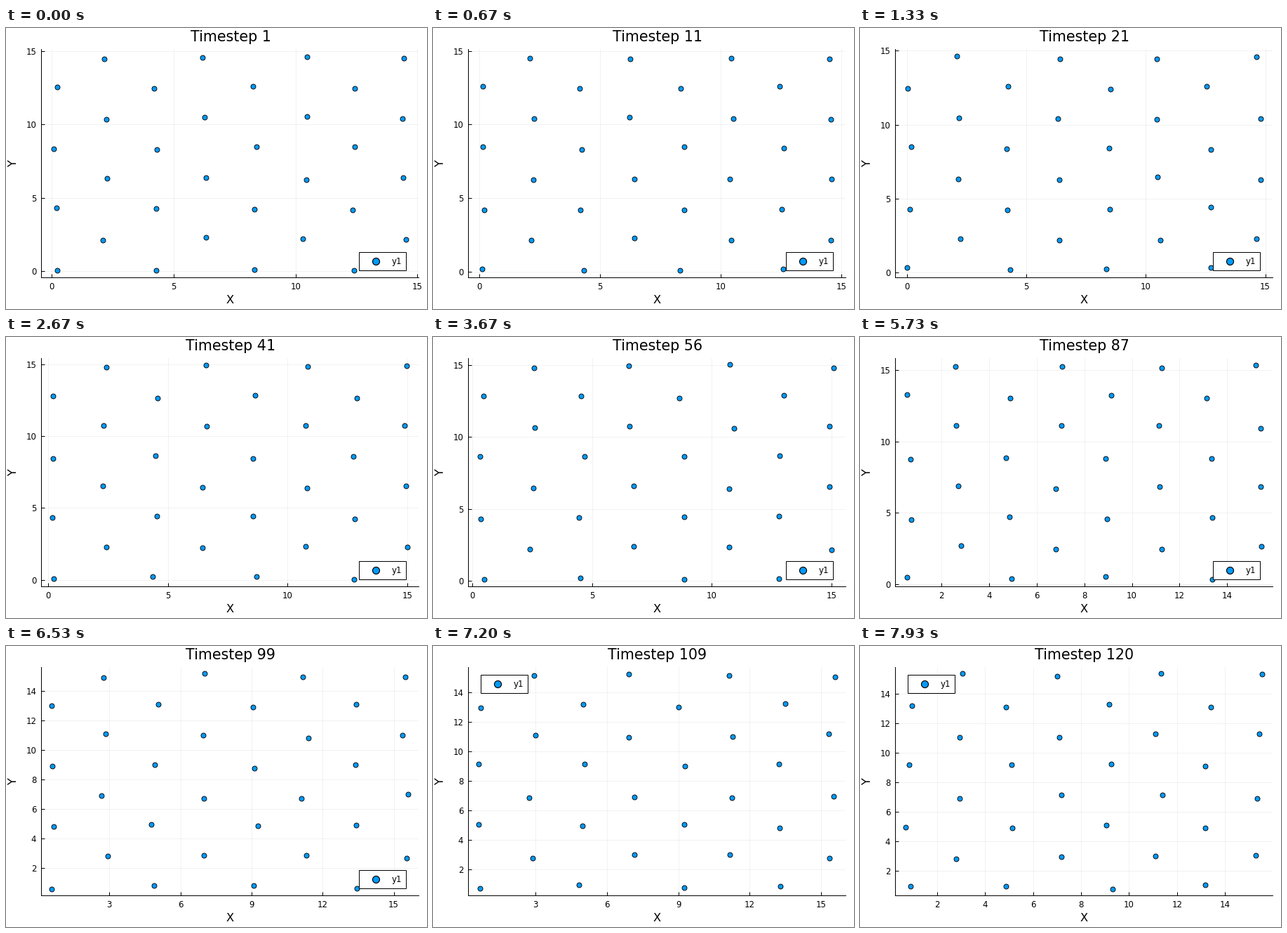
A matplotlib script that plays this animation: 600x400 px, repeating every 8 s.

```python
import numpy as np
import matplotlib.pyplot as plt
from matplotlib.animation import FuncAnimation
from matplotlib.patches import Rectangle

W, H, STEPS, LOOP = 600, 400, 120, 8000
FRAMES = STEPS + 1      # the last step is held for one extra frame
LEFT, RIGHT, TOP, BOTTOM = 50, 588, 30, 355
COLS, ROWS = 8, 4
INSET = 0.13            # gap between the lattice and the outermost dots
PAD = 0.03              # axis margin as a share of the data range
LEGEND_JUMP = 108       # step at which the legend changes corner
PT = 0.72               # points per pixel at 100 dpi
BLUE = "#009afa"

plt.rcParams["font.family"] = "DejaVu Sans"

# Slow drift of the crystal: its extent at a few steps.
KEYS = [1, 21, 41, 70, 87, 99, 120]
X_LO = [0.00, -0.04, 0.15, 0.37, 0.50, 0.57, 0.69]
X_HI = [14.61, 14.86, 15.02, 15.27, 15.46, 15.60, 15.54]
Y_LO = [0.00, 0.12, -0.01, 0.11, 0.30, 0.58, 0.75]
Y_HI = [14.70, 14.68, 14.98, 15.08, 15.40, 15.20, 15.37]

# Staggered lattice, both axes running from 0 to 1.
col, row = np.divmod(np.arange(COLS * ROWS), ROWS)
lattice = np.column_stack([col / (COLS - 1),
                           (2 * row + col % 2) / (2 * ROWS - 1)])

rng = np.random.default_rng(4)
period = rng.uniform(35, 70, lattice.shape)
phase = rng.uniform(0, 2 * np.pi, lattice.shape)


def extent(step):
    lo = np.array([np.interp(step, KEYS, X_LO), np.interp(step, KEYS, Y_LO)])
    hi = np.array([np.interp(step, KEYS, X_HI), np.interp(step, KEYS, Y_HI)])
    return lo, hi


def positions(step, lo, hi):
    """Lattice sites plus a thermal wobble that grows a little over time."""
    sites = lo + INSET + lattice * (hi - lo - 2 * INSET)
    size = 0.09 + 0.06 * step / STEPS
    wobble = size * np.sin(2 * np.pi * step / period + phase)
    return np.clip(sites + wobble, lo, hi)


def ticks(lo, hi):
    if lo <= 0 and hi >= 15:
        gap = 5
    else:
        gap = 3 if hi > 16 else 2
    return np.arange(np.ceil(lo / gap) * gap, hi, gap).astype(int)


fig = plt.figure(figsize=(W / 100, H / 100), dpi=100, facecolor="white")
ax = fig.add_axes([LEFT / W, 1 - BOTTOM / H, (RIGHT - LEFT) / W, (BOTTOM - TOP) / H])
ax.spines[["top", "right"]].set_visible(False)
ax.spines[["left", "bottom"]].set_linewidth(PT)
ax.set_axisbelow(True)
ax.grid(color="black", alpha=0.05, linewidth=PT)
ax.tick_params(direction="in", length=5 * PT, width=PT, labelsize=11.8 * PT)
ax.tick_params(axis="x", pad=6.5 * PT)
ax.tick_params(axis="y", pad=6.7 * PT)
dots, = ax.plot([], [], "o", ms=7 * PT, mfc=BLUE, mec="black", mew=0.9 * PT,
                clip_on=False, zorder=3)

# Overlay in stage pixels for the labels and the legend.
top = fig.add_axes([0, 0, 1, 1], zorder=5)
top.set(xlim=(0, W), ylim=(H, 0))
top.axis("off")


def label(x, y, text, size, **kw):
    return top.text(x, y, text, fontsize=size * PT, **kw)


title = label(320, 19, "", 20.7, ha="center")
label(319.5, 392, "X", 16.2, ha="center")
label(10.5, 193.5, "Y", 16.2, rotation=90, ha="center", va="center")

box = top.add_patch(Rectangle((0, 0), 67, 26, fc="white", ec="black", lw=PT))
key, = top.plot([], [], "o", ms=10 * PT, mfc=BLUE, mec="black", mew=1.2 * PT)
name = label(0, 0, "y1", 11.8)


def place_legend(x, y):
    box.set_xy((x, y))
    key.set_data([x + 24], [y + 13])
    name.set_position((x + 47.5, y + 17.3))


def update(i):
    step = min(i + 1, STEPS)
    lo, hi = extent(step)
    margin = PAD * (hi - lo)
    xlim, ylim = zip(lo - margin, hi + margin)
    ax.set_xticks(ticks(*xlim))
    ax.set_yticks(ticks(*ylim))
    ax.set(xlim=xlim, ylim=ylim)
    dots.set_data(*positions(step, lo, hi).T)
    title.set_text(f"Timestep {step}")
    if step < LEGEND_JUMP:
        place_legend(502.5, 318.5)
    else:
        place_legend(67.5, 41)
    return dots, title, box, key, name


anim = FuncAnimation(fig, update, frames=FRAMES, interval=LOOP / FRAMES,
                     init_func=lambda: update(0), repeat=True, repeat_delay=0)
plt.show()
```
